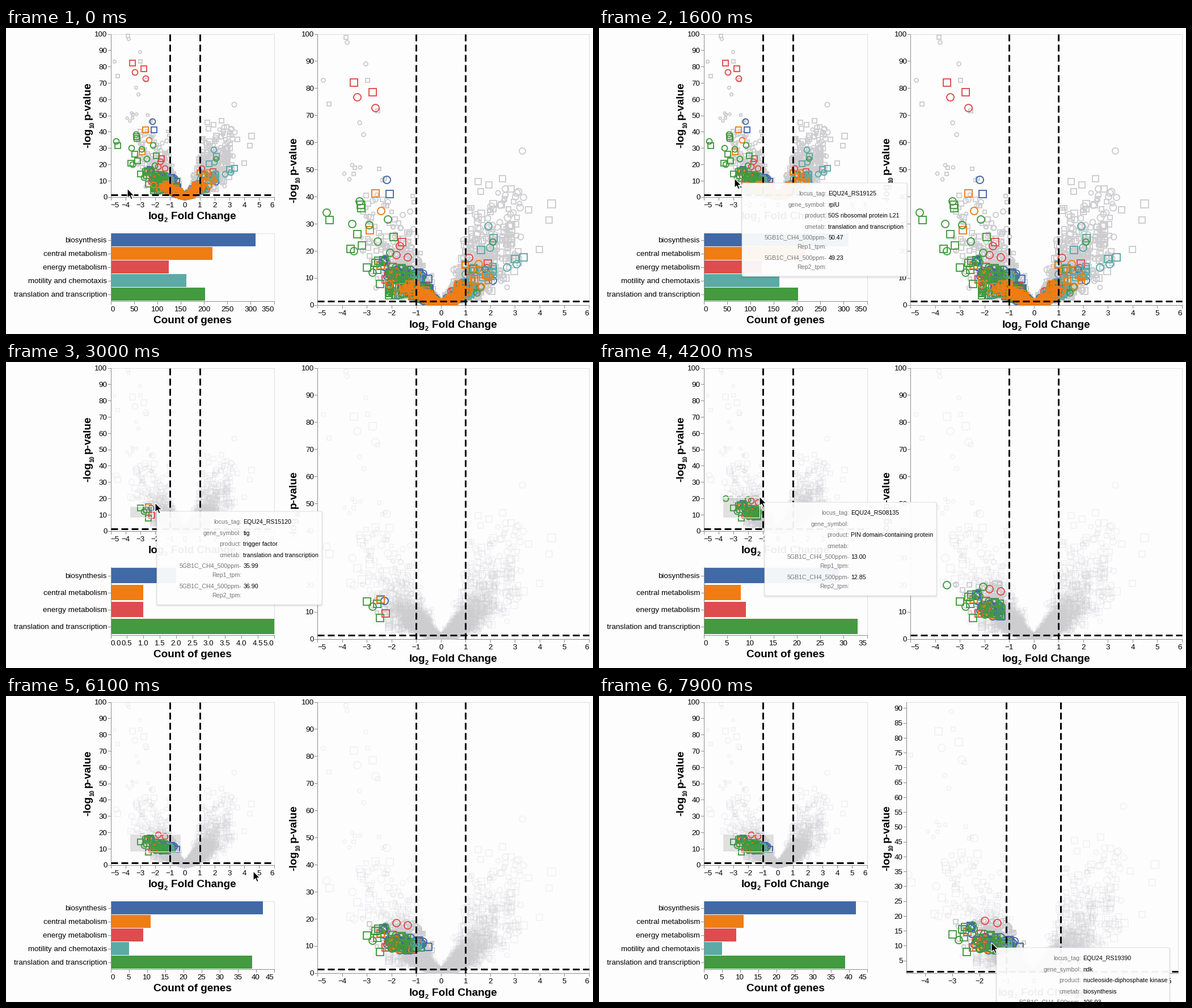
These frames come from a looping animation (1035x541 px, 8000 ms). A matplotlib script:

```python
import math

import matplotlib.pyplot as plt
import numpy as np
from matplotlib.animation import FuncAnimation
from matplotlib.lines import Line2D
from matplotlib.patches import FancyBboxPatch, Polygon, Rectangle

W, H, DPI = 1035, 541, 72          # at 72 dpi one point is one pixel
STEP_MS, FRAMES = 100, 80
BRUSH_START = 2300

plt.rcParams["font.family"] = "Liberation Sans"
GRAY, AXIS, FRAME = "#cdcdd0", "#8c8c8c", "#dedee2"
NAMES = ["biosynthesis", "central metabolism", "energy metabolism",
         "motility and chemotaxis", "translation and transcription"]
COLORS = ["#4169a6", "#f07c14", "#de4d4d", "#5caaa6", "#439a40"]
TOTALS = [310, 218, 124, 162, 202]
RIGHT_SHARE = [0.22, 0.45, 0.35, 0.85, 0.08]

# Outlying points: marker letters, then x, y pairs.
GRAY_OUT = ("sooossoosossss",
            [(-3.85, 98.8), (-3.8, 97), (-4.77, 83), (-3.05, 89), (-2.98, 83),
             (-4.54, 74.2), (-3.3, 67.3), (-3.14, 63), (-2.56, 71.7), (3.3, 56.9),
             (4.49, 37.3), (4.38, 31.4), (3.55, 35.2), (3.99, 20.6)])
BLUE_OUT = ("osos", [(-2.2, 46.2), (-2.08, 41), (-2.29, 14), (-2.46, 14.6)])
ORANGE_OUT = ("soss", [(-2.66, 41.2), (-2.43, 34.8), (-2.88, 27.7), (-2.45, 14.8)])
RED_OUT = ("ssoosooos",
           [(-3.53, 82.2), (-2.77, 78.6), (-3.39, 76.7), (-2.66, 72.8), (-1.57, 23.3),
            (-1.67, 21.8), (-1.8, 18.5), (-1.35, 17.6), (-2.24, 9.5)])
TEAL_OUT = ("sossoo", [(2.13, 24.7), (1.97, 21.2), (3.34, 17.6), (3, 17),
                       (3.07, 15.1), (2.68, 13.9)])
GREEN_OUT = ("osossooososssoososs",
             [(-4.63, 34.1), (-4.52, 31.4), (-3.3, 38.3), (-3.25, 37), (-3.23, 35.8),
              (-2.15, 31.6), (-3.6, 30), (-2.9, 29.5), (-3.39, 26.2), (-2.56, 23.5),
              (-1.92, 25.2), (-3.2, 22), (-3.66, 20.8), (-3.53, 19.9), (-2.05, 19.3),
              (-3, 13.9), (-2.77, 12), (-2.58, 13), (-2.47, 7.9)])
OUTLIERS = [BLUE_OUT, ORANGE_OUT, RED_OUT, TEAL_OUT, GREEN_OUT]

# Points above y = 8 on the left arm, by x band.
BANDS = [(-2.2, -1.25), (-1.23, -0.82), (-0.78, -0.4)]
BAND_COUNTS = [(24, 10, 3), (7, 3, 0), (5, 0, 0), (0, 5, 0), (26, 6, 0)]


def make_data():
    """Arrays x, y, category and group code; category 0 is uncategorised."""
    rng = np.random.default_rng(7)
    rows = []                                  # x, y, category, shape, size, layer

    def add(x, y, cat, size, layer, letter=None):
        shape = rng.integers(2) if letter is None else "os".index(letter)
        rows.append((x, y, cat, shape, size, layer))

    for _ in range(2700):
        side = rng.choice([-1, 1])
        a = min(rng.gamma(1.6, 0.55), rng.uniform(2.6, 3.3))
        y = 7 * a ** 1.25 * rng.lognormal(0, 0.5)
        if y > 42:
            y *= 0.45
        add(side * a, y, 0, rng.choice([6, 8, 9] if side < 0 else [8, 10, 12]), 0)
    for letter, (x, y) in zip(*GRAY_OUT):
        add(x, y, 0, 7 if x < 0 else 14 if x > 4.4 else 11, 0, letter)
    for _ in range(9):
        add(rng.uniform(-4.2, -2.2), rng.uniform(46, 52), 0, 6, 0)
        add(rng.uniform(1.4, 3.5), rng.uniform(36, 47), 0, 11, 0)

    for c, (letters, points) in enumerate(OUTLIERS):
        cat = c + 1
        for letter, (x, y) in zip(letters, points):
            add(x, y, cat, 13, 2, letter)
        if c in (0, 4):
            for _ in range(4):
                add(rng.uniform(-2.65, -2.22), rng.uniform(15.4, 17.4), cat, 13, 2)
        for (lo, hi), count in zip(BANDS, BAND_COUNTS[c]):
            for _ in range(count):
                x = rng.uniform(lo, hi)
                add(x, 8.3 + rng.triangular(0, 0.8, 2.5 - 2.8 * x), cat, 13,
                    rng.integers(1, 3))
        for _ in range(TOTALS[c] - len(points) - sum(BAND_COUNTS[c])):
            right = rng.random() < RIGHT_SHARE[c]
            a = min(rng.gamma(2, 0.42 if c > 2 else 0.3), 2.1)
            y = 6 * a ** 1.2 * rng.lognormal(0, 0.35)
            if not right and y > 7.7:
                y = rng.uniform(3.5, 7.7)
            add(a if right else -a, y, cat, rng.choice([11, 13]),
                3 if c == 1 else rng.integers(1, 3))
    x, y, *codes = np.array(rows, float).T
    cat, shape, size, layer = (v.astype(int) for v in codes)
    return x, y, cat, ((layer * 6 + cat) * 2 + shape) * 20 + size


X, Y, CAT, CODE = make_data()

fig = plt.figure(figsize=(W / DPI, H / DPI), dpi=DPI, facecolor="#fdfdfe")
ax = fig.add_axes([0, 0, 1, 1])
ax.set_xlim(0, W)
ax.set_ylim(H, 0)
ax.axis("off")
live = []                                      # artists of the current frame


def put(artist, z, clip=None):
    artist.set_zorder(z)
    ax.add_artist(artist)
    if clip is not None:
        artist.set_clip_path(clip)
    live.append(artist)


def line(x0, y0, x1, y1, color=AXIS, lw=1.0, z=1.2, **kw):
    put(Line2D([x0, x1], [y0, y1], color=color, lw=lw, **kw), z)


def box(x0, y0, x1, y1, z, **kw):
    put(Rectangle((x0, y0), x1 - x0, y1 - y0, **kw), z)


def label(x, y, s, ha="center", size=13.4, z=5, color="black", **kw):
    """Text centred on y by its digits' height."""
    live.append(ax.text(x, y + 0.36 * size, s, ha=ha, va="baseline", fontsize=size,
                        color=color, zorder=z, **kw))


def tick_step(span, count):
    raw = span / count
    power = 10.0 ** math.floor(math.log10(raw))
    ratio = raw / power
    return power * (10 if ratio >= 50 ** 0.5 else 5 if ratio >= 10 ** 0.5
                    else 2 if ratio >= 2 ** 0.5 else 1)


def ticks(lo, hi, step):
    first, last = math.ceil(lo / step - 1e-6), math.floor(hi / step + 1e-6)
    return [k * step for k in range(first, last + 1)]


def x_labels(values, pos, left, right, axis_y, fmt):
    """Bottom axis labels; those on an end of the axis stay inside it."""
    for v in values:
        px = pos(v)
        line(px, axis_y, px, axis_y + 5)
        ha, at_x = "center", px
        if px < left + 2:
            ha, at_x = "left", left
        elif px > right - 2:
            ha, at_x = "right", right
        label(at_x, axis_y + 13.5, (fmt % v).replace("-", "\u2212"), ha)


class Panel:
    """Maps data values to pixels inside one plot rectangle."""

    def __init__(self, left, top, size, x0, y0, kx, ky):
        self.left, self.top = left, top
        self.right, self.bottom = left + size, top + size
        self.x0, self.y0, self.kx, self.ky = x0, y0, kx, ky

    def px(self, v):
        return self.left + (v - self.x0) * self.kx

    def py(self, v):
        return self.bottom - (v - self.y0) * self.ky

    def axes(self, y_step):
        l, t, r, b = self.left, self.top, self.right, self.bottom
        box(l, t, r, b, 1, fc="none", ec=FRAME, lw=1)
        line(l, t, l, b)
        line(l, b, r, b)
        for v in ticks(self.y0, self.y0 + (b - t) / self.ky, y_step):
            line(l - 5, self.py(v), l, self.py(v))
            label(l - 6, self.py(v), "%d" % v, "right")
        x_end = self.x0 + (r - l) / self.kx
        x_labels(ticks(self.x0, x_end, 1), self.px, l, r, b, "%d")

        dash = dict(color="black", lw=3, z=4, ls=(0, (4, 2)))
        for v in (-1, 1):
            line(self.px(v), t, self.px(v), b, **dash)
        line(l, self.py(1.3), r, self.py(1.3), **dash)

    def marks(self, mask, scale, z, alpha=1.0, gray=False, clip=None):
        xs, ys, codes = self.px(X[mask]), self.py(Y[mask]), CODE[mask]
        for code in np.unique(codes):
            rest, size = divmod(int(code), 20)
            cat, shape = divmod(rest, 2)
            cat %= 6
            color = GRAY if gray or cat == 0 else COLORS[cat - 1]
            sel = codes == code
            put(Line2D(xs[sel], ys[sel], ls="", marker="os"[shape], mfc="none",
                       mec=color, mew=1.9, ms=size * scale, alpha=alpha), z, clip)


def x_title(x, y):
    label(x, y, "log", "left", 19, weight="bold")
    label(x + 28, y + 8, "2", "left", 11, weight="bold")
    label(x + 155, y, "Fold Change", "right", 19, weight="bold")


def y_title(x, y):
    kw = dict(rotation=90, rotation_mode="anchor", ha="left", va="baseline",
              weight="bold", zorder=5)
    for dx, dy, s, size in [(0, 0, "-log", 19), (6, 35, "10", 10.5),
                            (0, 50, "p-value", 19)]:
        live.append(ax.text(x + dx, y - dy, s, fontsize=size, **kw))


# Keyframes: ms, then values.
CURSOR = np.array([(0, 214, 284), (900, 216, 282), (1600, 239, 266), (1900, 239, 266),
                   (2300, 218, 275), (3000, 263, 249), (4200, 283, 238),
                   (5200, 300, 241), (5600, 308, 244), (5900, 308, 244),
                   (6500, 692, 441), (7300, 692, 441), (7500, 692, 436)])
BRUSH = np.array([(2300, 218, 275), (3000, 257.5, 255), (4200, 283, 239),
                  (5200, 295, 239.5), (5600, 308, 244)])
COUNTS = np.array([(2300, 0, 0, 0, 0, 0), (3000, 2, 1, 1, 0, 5),
                   (4200, 29, 8, 9, 0, 33), (5200, 39, 11, 9, 5, 39),
                   (5600, 42, 11, 9, 5, 39)])
ZOOM = np.array([(7400, 1.0), (7900, 1.096)])
# start, end, offset from the cursor, width, tag, symbol, product, category, two values
TIPS = [
    (1300, 2000, 13, 8, 291, "EQU24_RS19125", "rplU", "50S ribosomal protein L21",
     NAMES[4], "50.47", "49.23"),
    (2500, 3600, 3, 15, 291, "EQU24_RS15120", "tig", "trigger factor",
     NAMES[4], "35.99", "36.90"),
    (3600, 4700, 9, 10, 303, "EQU24_RS08135", "", "PIN domain-containing protein",
     "", "13.00", "12.85"),
    (4700, 5600, 2, 7, 336, "EQU24_RS03345", "pilB",
     "type IV-A pilus assembly ATPase PilB", "", "38.70", "37.60"),
    (6500, 7500, 9, 14, 284, "EQU24_RS10380", "fabD", "ACP S-malonyltransferase",
     NAMES[0], "41.20", "40.75"),
    (7500, 8000, 9, 9, 305, "EQU24_RS19390", "ndk", "nucleoside-diphosphate kinase",
     NAMES[0], "106.93", "104.18")]
TIP_KEYS = ["locus_tag:", "gene_symbol:", "product:", "cmetab:",
            "5GB1C_CH4_500ppm-", "Rep1_tpm:", "5GB1C_CH4_500ppm-", "Rep2_tpm:"]
TIP_ROWS = [18, 38, 57.5, 77, 96.5, 112.5, 132, 148]
ARROW = np.array([(0, 0), (0, 16.5), (3.8, 13), (6.5, 19), (9.2, 17.8), (6.6, 12),
                  (11.8, 12)])


def at(keys, ms):
    return [np.interp(ms, keys[:, 0], col) for col in keys.T[1:]]


def draw_bars(counts):
    left, right, top, bottom = 184.5, 472.5, 362.5, 482.5
    box(left, top, right, bottom, 1, fc="none", ec=FRAME, lw=1)
    most = max(max(counts), 1)
    step = tick_step(most, 8)
    end = math.ceil(most / step - 1e-6) * step

    def pos(v):
        return left + v / end * (right - left)

    rows = [k for k in range(5) if counts[k]]
    for i, k in enumerate(rows):
        band = (bottom - top) / len(rows)
        mid = top + (i + 0.5) * band
        box(left, mid - 0.46 * band, pos(counts[k]), mid + 0.46 * band, 1.1,
            fc=COLORS[k], ec="none")
        line(left - 5, mid, left, mid)
        label(178, mid, NAMES[k], "right")
    line(left, top, left, bottom)
    line(left, bottom, right, bottom)
    x_labels(ticks(0, end, step), pos, left, right, bottom,
             "%.1f" if step < 1 else "%d")
    label(328.5, 515, "Count of genes", size=19, weight="bold")


def draw_tip(x, y, width, values):
    for grow, alpha in ((2.5, 0.03), (1.2, 0.06)):
        put(FancyBboxPatch((x - grow, y - grow + 1.5), width + 2 * grow, 165 + 2 * grow,
                           boxstyle="round,pad=0,rounding_size=4", fc="black",
                           ec="none", alpha=alpha), 7.9)
    put(FancyBboxPatch((x, y), width, 165, boxstyle="round,pad=0,rounding_size=3",
                       fc=(1, 1, 1, 0.94), ec="#dcdcdc", lw=0.8), 8)
    tag, symbol, product, category, rep1, rep2 = values
    shown = [tag, symbol, product, category, rep1, "", rep2, ""]
    for dy, key, value in zip(TIP_ROWS, TIP_KEYS, shown):
        label(x + 149, y + dy, key, "right", 10.6, 8.1, "#777777")
        label(x + 152.5, y + dy, value, "left", 10.6, 8.1)


def right_panel(zoom):
    """Right plot scaled about the pointer; it shifts once the 100 label is gone."""
    kx, ky = 43.545 * zoom, 4.79 * zoom
    if zoom == 1:
        return Panel(549, 10.5, 479, -5, 0, kx, ky)
    return Panel(541.5, 10.5, 479, -1.71 - 143 / kx, 9.29 - 44.5 / ky, kx, ky)


def draw(i):
    while live:
        live.pop().remove()
    ms = i * STEP_MS
    small = Panel(184.5, 10.5, 288, -5, 0, 288 / 11, 2.88)
    big = right_panel(at(ZOOM, ms)[0])
    window = Rectangle((big.left, big.top), 479, 479, transform=ax.transData)

    brushing = ms > BRUSH_START
    inside = np.ones(len(X), bool)
    if brushing:
        bx, by = at(BRUSH, ms)
        box(218, by, bx, 275, 1.5, fc="#333333", alpha=0.14, ec="none")
        box(218, by, bx, 275, 3.5, fc="none", ec="white", lw=1)
        px, py = small.px(X), small.py(Y)
        inside = (px >= 218) & (px <= bx) & (py >= by) & (py <= 276)

    for panel, scale, clip in ((small, 0.76, None), (big, 1, window)):
        if brushing:
            panel.marks(~inside, scale, 2, 0.2, gray=True, clip=clip)
        panel.marks(inside & (CAT == 0), scale, 2.1, clip=clip)
        panel.marks(inside & (CAT > 0), scale, 2.2, clip=clip)

    small.axes(10)
    big.axes(tick_step(479 / big.ky, 13))
    x_title(251, 331)
    x_title(big.left + 162, 523)
    y_title(149, 212)
    y_title(512, 309)
    draw_bars([round(v) for v in at(COUNTS, ms)] if brushing else TOTALS)
    line(0, 540.5, W, 540.5, "#b4b4b4")

    cx, cy = at(CURSOR, ms)
    for start, end, dx, dy, width, *values in TIPS:
        if start <= ms < end:
            draw_tip(cx + dx, cy + dy, width, values)
    put(Polygon(ARROW + (cx, cy), fc="black", ec="white", lw=1.2), 9)
    return live


anim = FuncAnimation(fig, draw, frames=FRAMES, interval=STEP_MS, init_func=lambda: [],
                     repeat=True, repeat_delay=0)
plt.show()
```
